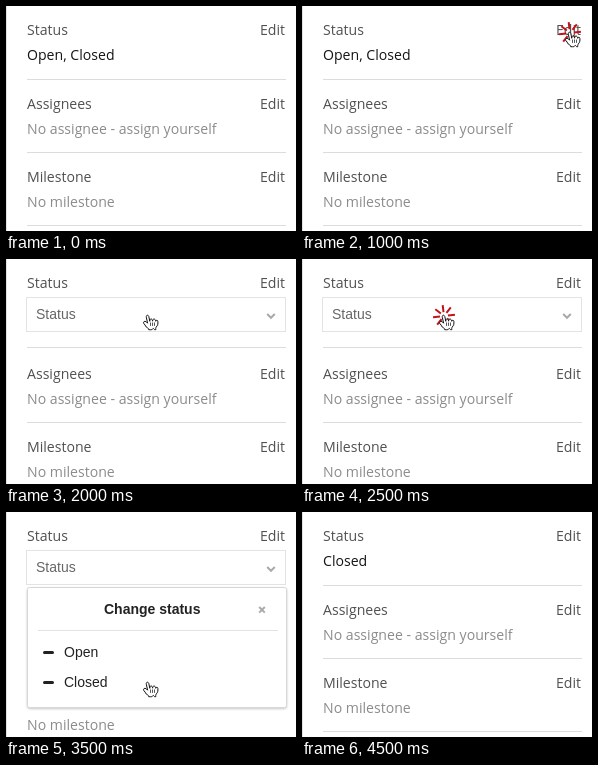
Write an HTML page that moves like this. It is 290x225 px and loops after 6000 ms.

```html
<!DOCTYPE html>
<html lang="en">
<head>
<meta charset="utf-8">
<title>Status dropdown</title>
<style>
  html, body { margin: 0; height: 100%; overflow: hidden; background: #fff; }
  svg { display: block; width: 100vw; height: 100vh; }
  text { font: 14.1px "Open Sans", "Noto Sans", sans-serif; fill: #505050; }
  .muted { fill: #8b8b8b; }
  .value { fill: #151515; }
  .ui { font: 14px "Liberation Sans", Arial, sans-serif; fill: #222; }
  .line { fill: #dcdcdc; }
  .popup { filter: drop-shadow(0 1px 1px rgba(0, 0, 0, .22)); }
</style>
</head>
<body>
<svg viewBox="0 0 290 225">
  <rect width="1" height="225" fill="#e3e3e3"/>
  <text x="21" y="29">Status</text>
  <text x="254" y="29">Edit</text>

  <g id="closedView">
    <text id="value" class="value" x="21" y="54"></text>
    <rect class="line" x="21" y="73" width="259" height="1"/>
  </g>

  <g id="select">
    <rect x="20.5" y="38.5" width="259" height="34" fill="#fff" stroke="#e3e3e3"/>
    <text class="ui" x="30" y="60" style="fill:#666">Status</text>
    <path d="M261.2 55l3.8 3.8 3.8-3.8" fill="none" stroke="#aaa" stroke-width="2"/>
    <rect class="line" x="21" y="88" width="259" height="1"/>
  </g>

  <g id="assignees">
    <text x="21" y="103">Assignees</text>
    <text x="254" y="103">Edit</text>
    <text class="muted" x="21" y="128">No assignee - assign yourself</text>
    <rect class="line" x="21" y="146" width="259" height="1"/>
  </g>
  <g id="milestone">
    <text x="21" y="176">Milestone</text>
    <text x="254" y="176">Edit</text>
    <text class="muted" x="21" y="201">No milestone</text>
    <rect class="line" x="21" y="219" width="259" height="1"/>
  </g>

  <g id="popup">
    <rect class="popup" x="21.5" y="75.5" width="259" height="120" rx="2" fill="#fff" stroke="#d8d8d8"/>
    <text class="ui" x="98" y="102" style="font-weight:bold">Change status</text>
    <path d="M253.2 95l5.6 5.6m0-5.6l-5.6 5.6" stroke="#aaa" stroke-width="2"/>
    <rect x="32" y="118" width="240" height="1" fill="#e3e3e3"/>
    <path d="M38.5 140.5h8M38.5 170.5h8" stroke="#222" stroke-width="3" stroke-linecap="round"/>
    <text class="ui" x="58" y="145">Open</text>
    <text class="ui" x="58" y="175">Closed</text>
  </g>

  <g id="pointer">
    <path id="burst" fill="none" stroke="#c4121a" stroke-width="2"/>
    <g transform="translate(0 .6)" stroke="#111" stroke-linejoin="round">
      <path fill="#fff" d="M3.3 12.5L2.1 10.5.6 8.6C.2 7.3 1.5 5.9 3.3 7.2L4.6 8.6 3.3 2.6C3 .3 5.2-.1 5.8 1.9L6.8 6.7C6.6 3.5 9.4 3.6 9.6 6.6C9.7 3.7 12.4 3.7 12.7 6.7C12.9 5.2 14.9 5.4 14.9 6.9C15 9 14.8 10.6 14 11.4C12.9 12.8 12.6 13.2 12.8 15.1C11.6 15.3 11.2 14.9 10.6 14C10.3 13.6 10 13.8 9.8 14.1C9.2 15.2 8.9 15.2 5.7 15.1C5.8 13.9 5.2 13.6 3.3 12.5Z"/>
      <path d="M7.5 7.9v3.4M9.5 7.9v3.4M11.5 7.9v3.4" stroke-width=".7"/>
    </g>
  </g>
</svg>
<script>
const STEP = 500, LOOP = 6000;
const el = id => document.getElementById(id);
const show = (id, on) => el(id).style.display = on ? '' : 'none';
const move = (id, x, y) => el(id).setAttribute('transform', `translate(${x} ${y})`);

// Eight slightly tilted rays around the fingertip
el('burst').setAttribute('d', Array.from({ length: 8 }, (_, i) => {
  const angle = i * Math.PI / 4 - 0.12;
  const at = r => `${5 + r * Math.cos(angle)} ${2 + r * Math.sin(angle)}`;
  return `M${at(4)}L${at(11)}`;
}).join(''));

// Each phase lasts three steps: rest, pointer appears, click
const targets = [[263, 25], [137, 55], [137, 169]];

function draw(now) {
  const step = Math.floor(now % LOOP / STEP);
  const phase = Math.min(Math.floor(step / 3), 3);
  const open = phase === 1 || phase === 2;
  const target = targets[phase];

  show('closedView', !open);
  show('select', open);
  show('popup', phase === 2);
  el('value').textContent = phase === 3 ? 'Closed' : 'Open, Closed';
  move('assignees', 0, open ? 17 : 0);
  move('milestone', 0, open ? 17 : 0);

  show('pointer', target && step % 3 > 0);
  show('burst', step % 3 === 2);
  if (target) move('pointer', ...target);
}

const start = performance.now();
function tick() {
  draw(performance.now() - start);
  requestAnimationFrame(tick);
}
tick();
</script>
</body>
</html>
```
